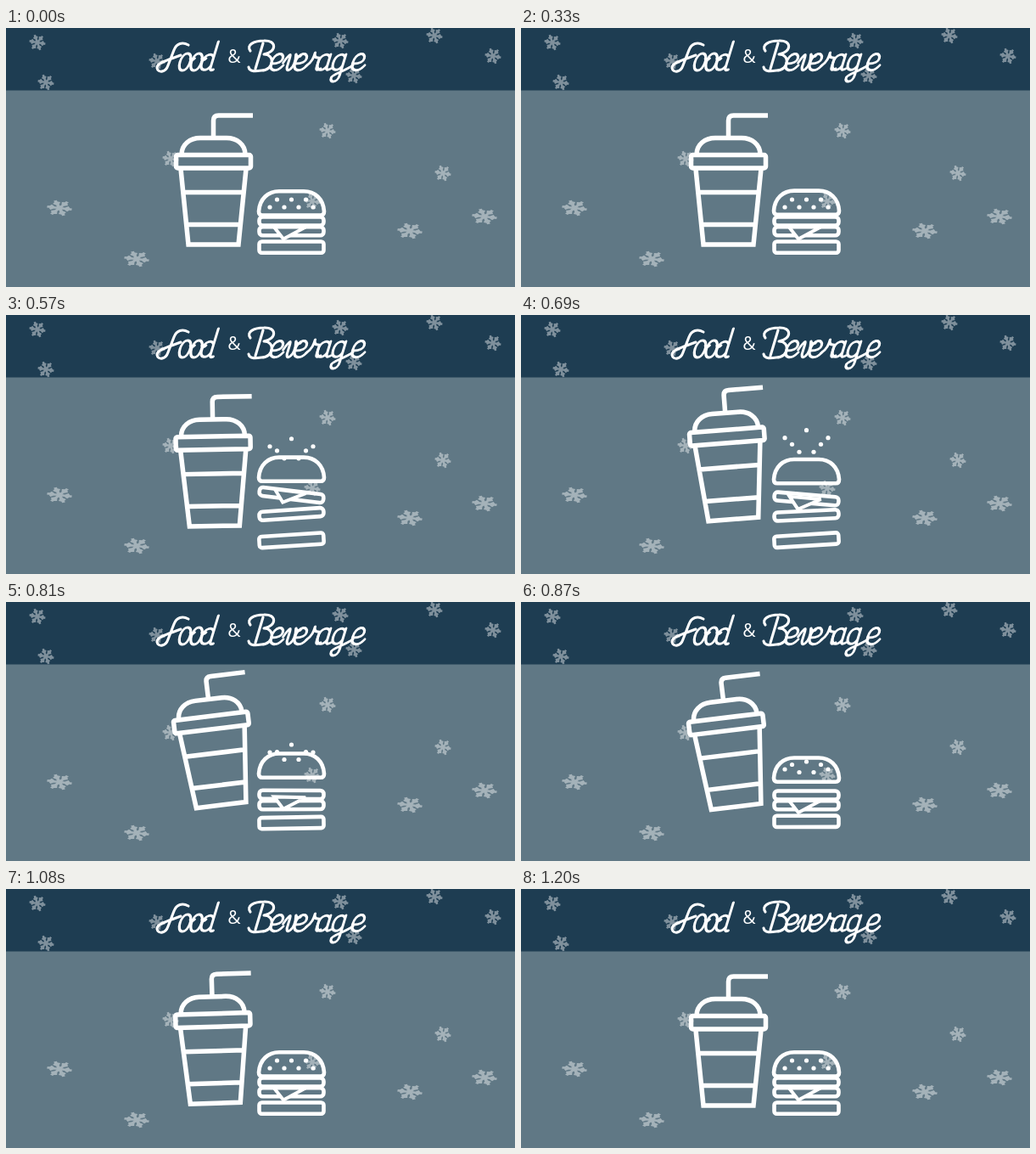
These frames come from a looping animation (600x305 px, 2100 ms). An HTML page:

```html
<!DOCTYPE html>
<html lang="en">
<head>
<meta charset="utf-8">
<title>Food &amp; Beverage</title>
<style>
  html, body { margin: 0; width: 100%; height: 100%; overflow: hidden; background: #607885; }
  svg { display: block; width: 600px; height: 305px; }
  .line { fill: none; stroke: #fff; }
  .script { stroke-width: 3.1; stroke-linecap: round; stroke-linejoin: round; }
  .amp { font: 21px "Open Sans", "Noto Sans", sans-serif; fill: #fff; text-anchor: middle; }
  #snow { fill: none; stroke: #fff; stroke-width: 2.5; }
  #cup { stroke-width: 5.5; }
  #burger { stroke-width: 4.6; }
  #seeds { fill: #fff; stroke: none; }
  #cheese { fill: #607885; stroke-width: 4; }
</style>
</head>
<body>
<svg viewBox="0 0 600 305" role="img" aria-label="Food &amp; Beverage">
  <rect width="600" height="305" fill="#607885"/>
  <rect width="600" height="73.5" fill="#1e3d52"/>
  <g id="snow"></g>

  <g id="title" class="line script">
    <path d="M215 20C208 16 201 18 198 26L191 44C188 53 179 53 178 47C178 41 190 38 206 32"/>
    <path d="M288 27C283 20 292 15 304 15C319 14 320 28 304 31C318 31 316 50 301 50C295 51 287 52 286 46M303 18L294 48"/>
  </g>
  <text class="amp" x="269" y="41">&amp;</text>

  <g id="cup" class="line">
    <path d="M244.5 129V109Q244.5 103 250.5 103H291"/>
    <path d="M207 149C207 137 217 129.5 229 129.5H260C272 129.5 282 137 282 149"/>
    <rect x="200.5" y="149.5" width="88" height="15.5" rx="2"/>
    <path d="M206 166L215 255H274L283 166M209 193.5H280M213 231.5H276"/>
  </g>

  <g id="burger" class="line">
    <path id="bun" d="M302 220.5H371Q375 220.5 375 216C374 201 364 192.3 351 192.3H322C309 192.3 299 201 298 216Q298 220.5 302 220.5Z"/>
    <g id="seeds"></g>
    <rect id="lettuce" x="298.5" y="222.5" width="76" height="10" rx="4"/>
    <rect id="patty" x="298.5" y="234.3" width="76" height="10" rx="4"/>
    <path id="cheese" d="M316 234.5L327 248.5L353 234.5Z"/>
    <rect id="base" x="298.5" y="251.5" width="76" height="13.2" rx="3"/>
  </g>
</svg>
<script>
const LOOP = 2100, STEP = 30;
const $ = id => document.getElementById(id);

function add(parent, tag, attrs) {
  const el = document.createElementNS("http://www.w3.org/2000/svg", tag);
  for (const key in attrs) el.setAttribute(key, attrs[key]);
  return parent.appendChild(el);
}

// Slanted script letters on a shared baseline: advance and stroke
const bowl = "M10 -15C8 -21 -2 -20 -2 -9C-2 2 8 1 10 -6";
const glyphs = {
  o: [13.5, "M5 -20C-3 -20 -3 0 5 0C13 0 13 -20 5 -20M10 -14q3 3 5 0"],
  d: [17, bowl + "M10 -34V-4q0 5 4 3"],
  e: [14, "M-1 -8C7 -8 10 -11 10 -14C10 -22 -2 -22 -2 -9C-2 2 8 2 13 -6"],
  v: [14, "M-2 -9C1 -17 4 -22 4 -15V-4q1 5 4 3C12 -4 12 -12 10 -19q2 4 6 2"],
  r: [13, "M-2 -5C4 -10 4 -16 4 -21q0 6 5 6q3 0 2 3V-4q0 5 5 2"],
  a: [18, bowl + "M10 -19V-4q0 5 5 2"],
  g: [23, bowl + "M10 -19V6C10 15 0 15 1 8C2 4 14 1 22 -6"]
};
function write(word, x) {
  for (const ch of word) {
    const [advance, d] = glyphs[ch];
    add($("title"), "path", { d, transform: `translate(${x} 50) skewX(-17)` });
    x += advance;
  }
}
write("ood", 203);
write("everage", 312);

// Six barbed arms; flakes near the ground are stretched sideways
let flake = "";
for (let k = 0; k < 6; k++) {
  const at = (r, deg) => {
    const a = (k * 60 + deg) * Math.PI / 180;
    return `${(r * Math.cos(a)).toFixed(2)} ${(r * Math.sin(a)).toFixed(2)}`;
  };
  flake += `M0 0L${at(9.5, 0)}M${at(7.5, 16)}L${at(4.5, 0)}L${at(7.5, -16)}`;
}
const spots = "37,17 47,64 178,39 394,15 505,9 574,33 410,56 379,121 194,154 "
  + "515,171 361,204 63,212 564,222 476,239 154,272";
for (const spot of spots.split(" ")) {
  const wide = spot.split(",")[1] > 210 ? 1.55 : 1;
  add($("snow"), "path", {
    d: flake, opacity: .43, transform: `translate(${spot}) scale(${wide} 1) rotate(10)`
  });
}

// Each part leaves its place at `from`, is farthest at `peak` and back at `end`
const parts = [];
function hop(el, from, peak, end, lift, turn = 0) {
  const box = el.getBBox();
  const pivot = `${box.x + box.width / 2} ${box.y + box.height / 2}`;
  parts.push({ el, from, peak, end, lift, turn, pivot });
}
hop($("bun"), 300, 590, 1060, -25);
hop($("lettuce"), 330, 600, 840, -16, 7);
hop($("patty"), 330, 600, 840, -5, -4);
hop($("cheese"), 330, 570, 900, -27, 7);
hop($("base"), 330, 630, 900, 8, -4);
for (let i = 0; i < 7; i++) {
  const seed = add($("seeds"), "circle", { cx: 311 + i * 8.5, cy: i % 2 ? 202 : 211, r: 2.6 });
  hop(seed, 330, 660, 960, i % 3 ? -51 : -68);
}
// the cup rises a little before it tips
const cup = $("cup");
hop(cup, 420, 760, 1200, -16);
hop(cup, 480, 840, 1200, 0, -7);

const ease = p => (1 - Math.cos(Math.PI * Math.min(1, Math.max(0, p)))) / 2;

function draw(ms) {
  const t = Math.floor((ms % LOOP) / STEP) * STEP;
  const moves = new Map();
  for (const { el, from, peak, end, lift, turn, pivot } of parts) {
    const far = t < peak ? ease((t - from) / (peak - from)) : ease((end - t) / (end - peak));
    const move = `translate(0 ${lift * far}) rotate(${turn * far} ${pivot}) `;
    moves.set(el, (moves.get(el) || "") + move);
  }
  moves.forEach((move, el) => el.setAttribute("transform", move));
}

const start = performance.now();
function tick() {
  draw(performance.now() - start);
  requestAnimationFrame(tick);
}
tick();
</script>
</body>
</html>
```
